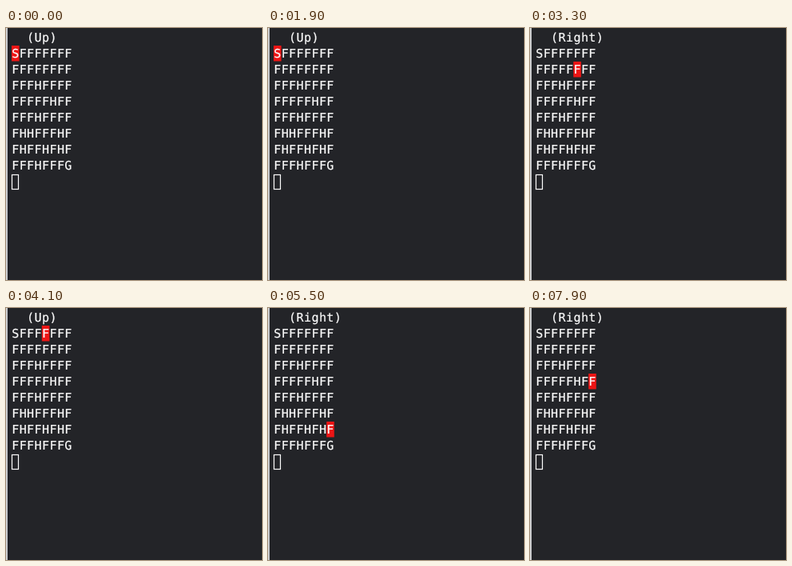
These frames come from a looping animation (320 px wide and 315 px high, 8000 ms). An HTML page:

```html
<!DOCTYPE html>
<html lang="en">
<head>
<meta charset="utf-8">
<title>Grid walk in a terminal</title>
<style>
  html, body { margin: 0; width: 100%; height: 100%; overflow: hidden; background: #232428; }
  svg { display: block; }
  text {
    font: 15px "DejaVu Sans Mono", "Liberation Mono", monospace;
    letter-spacing: 0.42px;
    text-rendering: geometricPrecision;
    fill: #fcfcfc;
    stroke: #fcfcfc;
    stroke-width: 0.2px;
  }
</style>
</head>
<body>
<svg id="stage" width="320" height="315" viewBox="0 0 320 315">
  <rect width="320" height="315" fill="#232428"/>
  <rect width="2" height="315" fill="#cbccce"/>
  <rect id="agent" width="9.6" height="19.5" fill="#ed1515"/>
  <text id="title" y="17"></text>
  <g id="map"></g>
  <rect x="7.5" y="183.5" width="8" height="18" fill="none" stroke="#fcfcfc" stroke-width="1.2"/>
</svg>
<script>
const CELL_W = 9.45, CELL_H = 20, LEFT = 7, TOP = 22;
const TICK = 100;
const MAP = ["SFFFFFFF", "FFFFFFFF", "FFFHFFFF", "FFFFFHFF",
             "FFFHFFFF", "FHHFFFHF", "FHFFHFHF", "FFFHFFFG"];

// One pair per tick: the chosen action, then where the slippery ice led.
const WALK = `
  U. U. U. UR RD UL UU U. UR RR
  RD UL UU RD UL UU UR RD UL UU
  UR RD UL UR UL UU U. U. UR RR
  RR RR RR RD UU R. RD UL UU R.
  RD UU RR R. RR RR RD DD DD RD
  RU RD R. R. RD RD RU RD RU R.
  R. R. RD R. R. R. RU R. R. RD
  RU RU RU RU DL RD RD UR RU R.`.trim().split(/\s+/);

const NAMES = { U: "Up", R: "Right", D: "Down", L: "Left" };
const STEPS = { U: [-1, 0], R: [0, 1], D: [1, 0], L: [0, -1], ".": [0, 0] };

let row = 0, col = 0;
const poses = WALK.map(([action, move]) => {
  row += STEPS[move][0];
  col += STEPS[move][1];
  return { row, col, title: `(${NAMES[action]})` };
});

const agent = document.getElementById("agent");
const title = document.getElementById("title");
title.setAttribute("x", LEFT + 2 * CELL_W + 0.2);

MAP.forEach((line, i) => {
  const text = document.createElementNS("http://www.w3.org/2000/svg", "text");
  text.setAttribute("x", LEFT + 0.2);
  text.setAttribute("y", TOP + CELL_H * i + 15);
  text.textContent = line;
  document.getElementById("map").append(text);
});

function draw(time) {
  const pose = poses[Math.floor(time / TICK) % poses.length];
  agent.setAttribute("x", LEFT + pose.col * CELL_W);
  agent.setAttribute("y", TOP + pose.row * CELL_H);
  title.textContent = pose.title;
}

const start = performance.now();
function loop() {
  draw(performance.now() - start);
  requestAnimationFrame(loop);
}
loop();
</script>
</body>
</html>
```
